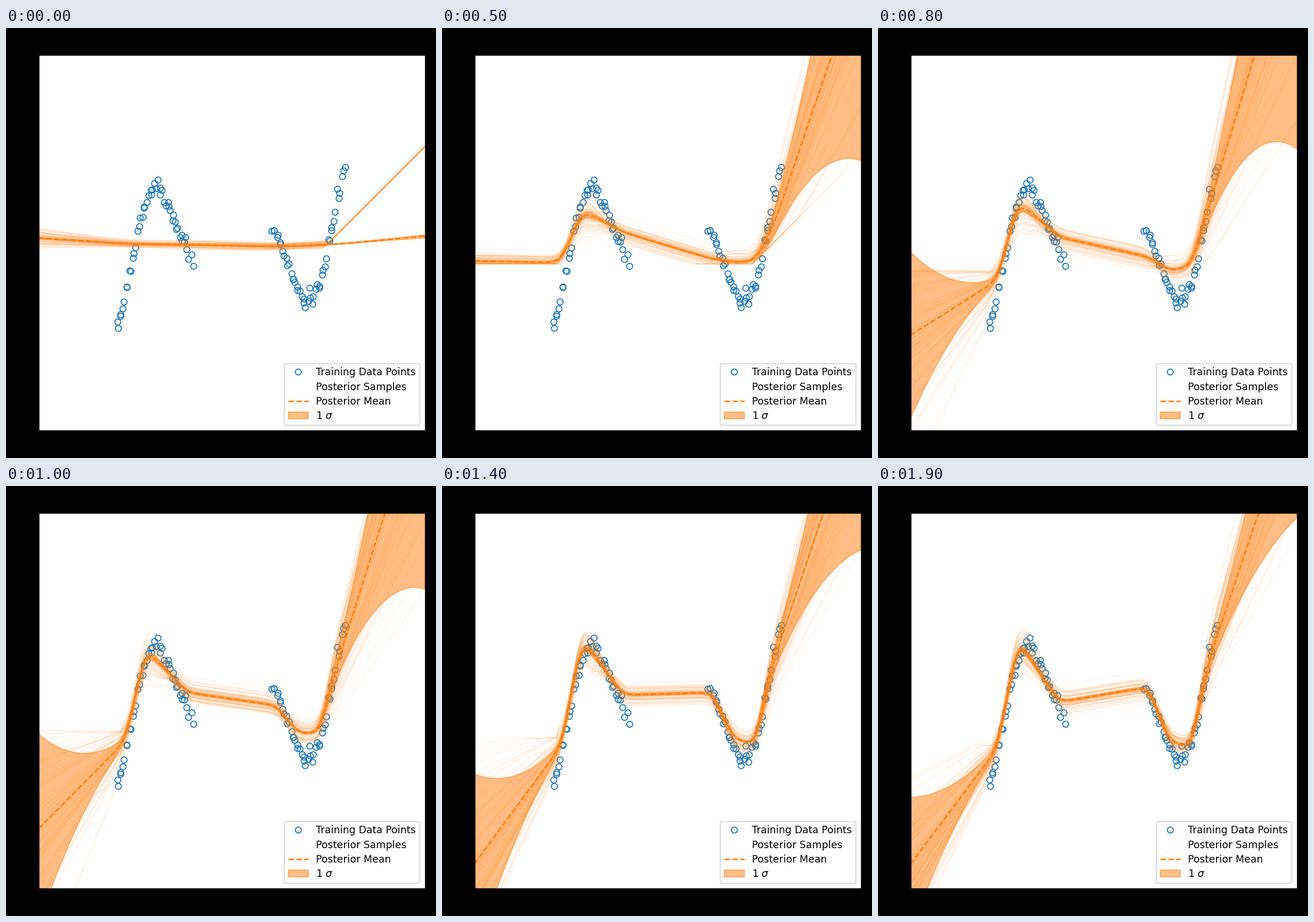
Recreate the animation shown at these times as a matplotlib script. Size 748x748 px, loop 2 s.

```python
import numpy as np
import matplotlib.pyplot as plt
from matplotlib.animation import FuncAnimation
from matplotlib.collections import LineCollection, PolyCollection
from matplotlib.lines import Line2D
from matplotlib.patches import Patch

SIZE, DPI = 748, 125
FRAMES, INTERVAL = 20, 100
LEFT, RIGHT, TOP, BOTTOM = 56.5, 728.5, 46.5, 699.5
BLUE, ORANGE = "#1f77b4", "#ff7f0e"
SAMPLES = 80
UNIT = 50  # pixels per data unit; the band shows the variance
FAN_LEFT, FAN_RIGHT = 233, 527  # where the spread starts to open

# The mean is a chain of straight pieces with soft corners. Each pose gives
# the corner heights, then the spread at the left and right edge.
CORNERS = np.array([57, 208, 243, 316, 470, 508, 545, 573, 728])
POSES = {
    0: (365, 375, 376, 377, 380, 379, 377, 376, 362, 1, 2),
    3: (398, 393, 337, 347, 394, 397, 390, 345, 27, 0, 247),
    5.5: (407, 412, 310, 358, 404, 410, 411, 358, -130, 0, 350),
    8: (534, 439, 301, 364, 398, 423, 415, 320, -197, 143, 407),
    12: (657, 448, 264, 355, 365, 437, 447, 320, -145, 182, 293),
    17: (657, 456, 268, 376, 350, 445, 456, 312, -150, 114, 205),
}

x = np.arange(LEFT, RIGHT + 1)


def training_points():
    rng = np.random.default_rng(4)
    px = np.concatenate([np.linspace(192, 324, 49), np.linspace(462, 590, 48)])
    px += rng.uniform(-2, 2, px.size)
    v = px - 393
    wave = 375 - 0.77 * np.abs(v) * np.sin(np.pi * v / 84)
    return px, wave + rng.normal(0, 7, px.size)


def pose_at(step):
    columns = zip(*POSES.values())
    return np.array([np.interp(step, list(POSES), col) for col in columns])


def mean_curve(heights, soft):
    slopes = np.diff(heights) / np.diff(CORNERS)
    y = heights[0] + slopes[0] * (x - CORNERS[0])
    for corner, turn in zip(CORNERS[1:-1], np.diff(slopes)):
        y += turn * soft * np.logaddexp(0, (x - corner) / soft)
    return y


def band_width(step, left, right):
    base = min(0.7 + 0.15 * step, 2)
    bump = min(step, 4) * np.exp(-((x - 255) / 22) ** 2)
    opening_left = np.clip((FAN_LEFT - x) / (FAN_LEFT - LEFT), 0, 1) ** 2
    opening_right = np.clip((x - FAN_RIGHT) / (RIGHT - FAN_RIGHT), 0, 1) ** 2
    return base + bump + left * opening_left + right * opening_right


def region_weights(soft):
    """Soft windows that let each stretch of a sample vary on its own."""
    gates = [1 / (1 + np.exp((c - x) / soft)) for c in (212, 285, 485, 550)]
    steps = np.array([np.ones_like(x), *gates, np.zeros_like(x)])
    return steps[:-1] - steps[1:]


def draw_samples(step, mean, width):
    rng = np.random.default_rng(100 + step)
    z = rng.normal(size=(SAMPLES, 5))
    jitter = rng.normal(0, 2, (SAMPLES, 1))
    weights = region_weights(8 + 60 * np.exp(-step))
    y = mean + np.sqrt(UNIT * width) * (z @ weights)
    if step > 6:  # the left fan does not rise above a level
        level = 423 + 2.5 * (step - 8) + jitter
        return np.maximum(y, level - 6 * np.clip(x - 200, 0, None))
    level = mean.max() + 3 + 12 * np.exp(-step)
    return np.minimum(y, level - np.clip(x - 540, 0, None))


fig = plt.figure(figsize=(SIZE / DPI, SIZE / DPI), dpi=DPI, facecolor="black")
ax = fig.add_axes([LEFT / SIZE, 1 - BOTTOM / SIZE,
                   (RIGHT - LEFT) / SIZE, (BOTTOM - TOP) / SIZE])
ax.set(xlim=(LEFT, RIGHT), ylim=(BOTTOM, TOP), xticks=[], yticks=[])

ring = dict(marker="o", ls="", ms=6, mfc="none", mec=BLUE, mew=1)
dash = dict(color=ORANGE, lw=1.5, ls="--")
ax.plot(*training_points(), zorder=1, **ring)
lines = LineCollection([], colors=ORANGE, alpha=0.12, linewidths=0.6, zorder=2)
band = PolyCollection([], facecolors=ORANGE, edgecolors=ORANGE, alpha=0.5,
                      linewidths=1, zorder=2.1)
ax.add_collection(lines, autolim=False)
ax.add_collection(band, autolim=False)
mean_line, = ax.plot([], [], zorder=2.2, **dash)

handles = [Line2D([], [], **ring), Line2D([], [], ls=""),
           Line2D([], [], **dash), Patch(color=ORANGE, alpha=0.5)]
labels = ["Training Data Points", "Posterior Samples", "Posterior Mean",
          r"1 $\sigma$"]
ax.legend(handles, labels, loc="lower right", fontsize=10,
          borderpad=0.38, labelspacing=0.42)


def update(step):
    *heights, left, right = pose_at(step)
    mean = mean_curve(heights, 5 + 6 * np.exp(-step / 4))
    width = band_width(step, left, right)
    samples = draw_samples(step, mean, width)
    lines.set_segments([np.column_stack([x, y]) for y in samples])
    upper = np.column_stack([x, mean - width])
    lower = np.column_stack([x, mean + width])
    band.set_verts([np.concatenate([upper, lower[::-1]])])
    mean_line.set_data(x, mean)
    return lines, band, mean_line


anim = FuncAnimation(fig, update, frames=FRAMES, interval=INTERVAL,
                     init_func=lambda: update(0), repeat=True, repeat_delay=0)
plt.show()
```
